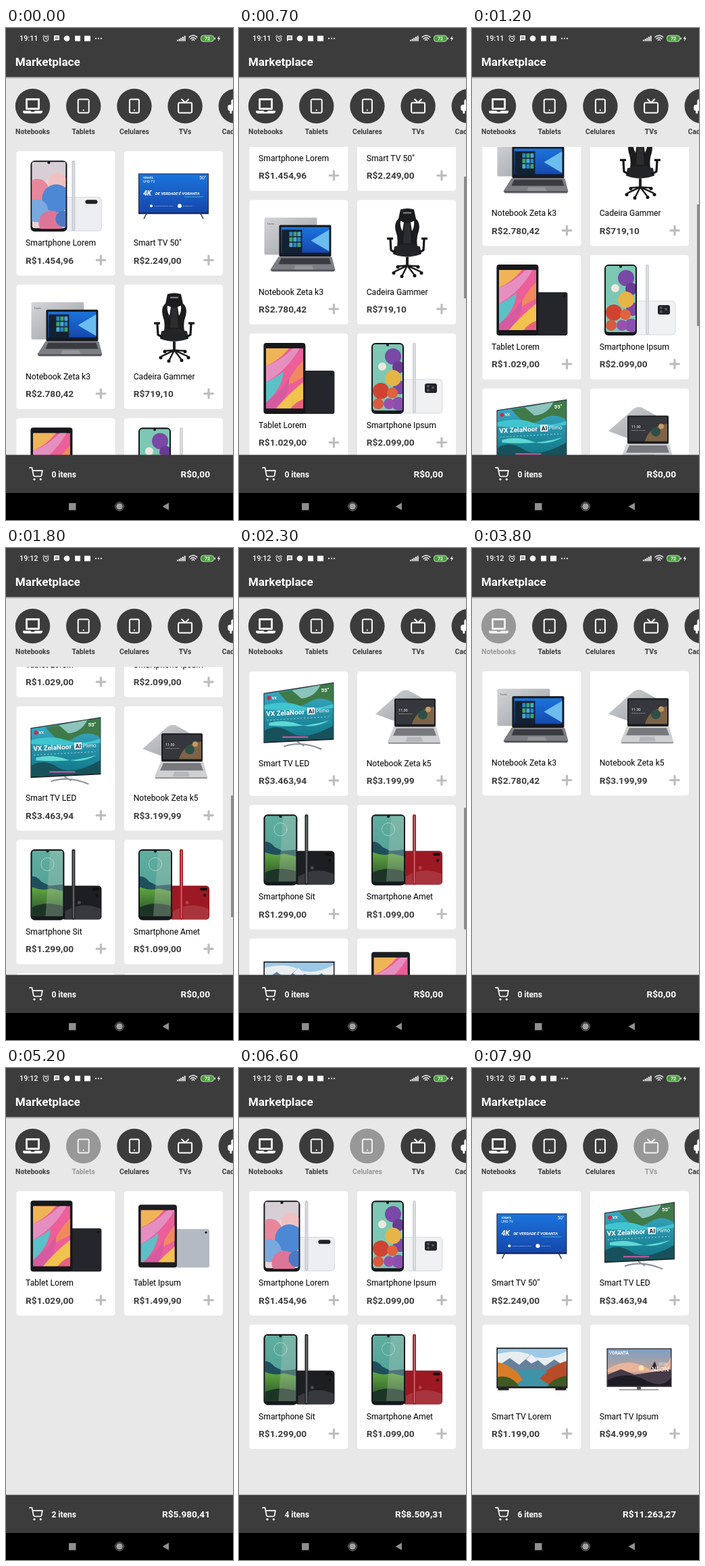
An HTML page for the animation above (8000 ms loop, 336 by 728 pixels).

```html
<!DOCTYPE html>
<html lang="pt-BR">
<head>
<meta charset="utf-8">
<title>Marketplace</title>
<style>
html, body { margin: 0; width: 100%; height: 100%; overflow: hidden; background: #e8e8e8; }
#stage { display: block; width: 336px; height: 728px; font-family: Roboto, sans-serif; }
.b { font-weight: 700; }
.name { font-size: 12.15px; fill: #000; }
.price { font-size: 13.69px; font-weight: 700; fill: #3c3c3c; }
.i { font-style: italic; }
</style>
</head>
<body>
<svg id="stage" viewBox="0 0 336 728"></svg>
<script>
const DARK = '#3c3c3c', LOOP = 8000, LIST_TOP = 176;
const stage = document.getElementById('stage');

// Drawing helpers
const box = (x, y, w, h, fill, r = 0) => `<rect x="${x}" y="${y}" width="${w}" height="${h}" rx="${r}" fill="${fill}"/>`;
const ball = (x, y, r, fill) => `<circle cx="${x}" cy="${y}" r="${r}" fill="${fill}"/>`;
const shape = (d, fill) => `<path d="${d}" fill="${fill}"/>`;
const line = (d, color, w, extra = '') => `<path d="${d}" fill="none" stroke="${color}" stroke-width="${w}" ${extra}/>`;
const text = (x, y, size, str, extra = '') => `<text x="${x}" y="${y}" font-size="${size}" fill="#fff" ${extra}>${str}</text>`;
const crop = (x, y, w, h, inner) => `<svg x="${x}" y="${y}" width="${w}" height="${h}">${inner}</svg>`;
const gradient = (id, from, to, dir = 'x2="0" y2="1"') =>
  `<linearGradient id="${id}" ${dir}><stop stop-color="${from}"/><stop offset="1" stop-color="${to}"/></linearGradient>`;

// Wallpapers
const bubbles = box(0, 0, 50, 98, '#e9d3d4', 4) + shape('M0 0H50V20L0 32Z', '#d8cfd6') +
  ball(8, 42, 17, '#e8879c') + ball(38, 30, 14, '#f1c1c2') + ball(36, 54, 21, '#4d88d4') +
  ball(7, 72, 17, '#79a9df') + ball(28, 90, 18, '#dd7598') + ball(47, 84, 12, '#4a78c4');
const fruits = box(0, 0, 44, 98, '#7cc8b4', 4) + ball(30, 18, 12, '#7a48a6') + ball(38, 34, 9, '#6a3a94') +
  ball(14, 33, 6, '#eee8e0') + ball(40, 64, 10, '#7a48a6') + ball(30, 50, 12, '#e6b548') + ball(12, 69, 12, '#cf4330') +
  ball(29, 72, 8, '#e0623c') + ball(38, 88, 10, '#8a4fb0') + ball(24, 88, 8, '#9a4fae') + ball(8, 88, 8, '#d85a40');
const coast = box(0, 0, 46, 97, 'url(#mist)', 4) + shape('M0 38Q8 38 14 46L26 52L46 50V70H0Z', '#1f4f5c') +
  shape('M0 54Q16 60 28 56L46 60V97H0Z', 'url(#grass)') + shape('M0 84Q20 74 46 82V97H0Z', '#1c3426') +
  shape('M27 0H46V97H20Z', 'rgba(190,205,190,.3)') +
  `<circle cx="23" cy="20" r="9.5" fill="none" stroke="#d9efe6" stroke-dasharray="1.5 1"/>`;
const swirl = box(0, 0, 60, 90, '#ec5f98') + shape('M0 0H34Q20 18 0 26Z', '#f0b458') +
  shape('M0 26Q20 20 40 0H50Q30 34 0 50Z', '#e58fc0') + shape('M60 14Q40 30 30 56L60 40Z', '#f08a5c') +
  shape('M0 50Q14 44 26 34Q24 60 0 80Z', '#5cc0c8') + shape('M0 80Q26 60 34 44Q36 70 14 90H0Z', '#d65aa0') +
  shape('M14 90Q34 66 60 46V74Q44 78 36 90Z', '#f2c24e') + shape('M36 90Q44 78 60 74V90Z', '#e8607c');

// Product pictures, each in a 105 x 105 box
const phone = (w, wall, side, back, camera) =>
  box(w - 4, 54, 109 - w, 50, back, 5) + `<rect x="${w - 4}" y="54" width="${109 - w}" height="50" rx="5" fill="none" stroke="#000" stroke-opacity=".18" stroke-width=".7"/>` +
  camera + box(0, 0, w, 105, '#16181c', 6) + crop(2, 2, w - 4, 99, wall) +
  ball(w / 2, 3, 2, '#16181c') + box(61, 0, 5, 104, side, 2) + box(63, 2, 1.2, 100, 'rgba(255,255,255,.45)');
const moto = (side, back) => phone(50, coast, side, back,
  box(91, 57, 11, 4, '#111', 2) + ball(98, 68, 2, '#111') + ball(72, 79, 2.5, 'rgba(255,255,255,.2)') +
  shape('M51 92Q75 76 104 88V99Q104 104 99 104H51Z', 'rgba(255,255,255,.12)'));
const tablet = (x, y, w, h, frame, back, top) =>
  box(x + w - 4, top, 109 - w - x, y + h - top, back, 3) + ball(100, top + 5, 1.6, '#111') +
  box(x, y, w, h, frame, 4) + crop(x + 3.5, y + 8, w - 7, h - 16, swirl);

const tv50 = line('M12 78L8 86M92 78L96 86', '#444', 1.5) +
  box(0, 19, 104, 60, '#15233c') + box(1, 20, 102, 57, 'url(#blue)') +
  text(7, 27, 3.2, 'VORANTA', 'class="b"') + text(7, 32.5, 5, 'UHD TV') + text(90, 28, 7, '50"') +
  text(7, 52, 10.5, '4K', 'class="b i"') + text(25, 51, 5.9, 'DE VERDADE É VORANTA', 'class="b i"') +
  line('M68 53.5H96', '#4fd0ff', .7) + ball(19, 67, 2, '#fff') + text(23, 68, 2.3, 'CONTROLE REMOTO ÚNICO') +
  ball(61, 67, 3, '#fff') + text(66, 68, 2.5, 'BLUETOOTH');
const tvLed = line('M30 97Q56 88 86 101M50 90L60 96', '#8b8f94', 2) + shape('M0 18L104 2V87L0 92Z', '#202428') +
  shape('M1 19L103 3.5V85L1 90Z', 'url(#sea)') + shape('M22 17L103 3.5V32Q84 20 66 32T34 30Z', '#3f7a48') +
  shape('M42 14L84 6Q76 24 56 26Z', '#8cc4bc') + shape('M1 36Q30 28 52 36T103 34V40Q60 46 1 42Z', '#3fc4d0') +
  shape('M1 74Q20 62 40 76T103 66V85L1 90Z', '#17525c') +
  shape('M8 62Q30 56 52 64T98 58Q60 70 8 66Z', '#5fd8d4') + box(28, 82, 38, 2, '#d65aa8') +
  ball(8, 25, 3, '#d0284c') + text(12, 27, 6, 'VX', 'class="b"') + text(85, 16, 8, '55"', 'class="b"') +
  `<g transform="rotate(-3 4 52)">${text(4, 52, 10, 'VX ZelaNoor', 'class="b"')}${box(65, 43, 11, 10, '#fff')}${text(66.5, 51.5, 9, 'AI', 'class="b" style="fill:#123"')}${text(77.5, 51, 7.8, 'Plimo')}</g>` +
  line('M5 58L96 53', '#c8f0ec', .8, 'stroke-dasharray="2 3"');
const tvLorem = box(0, 20, 105, 60, '#151515') + box(2, 78, 16, 5, '#222') + box(87, 78, 16, 5, '#222') +
  crop(1.5, 21.5, 102, 56, box(0, 0, 102, 56, '#9dc9e6') + shape('M0 8Q30 0 50 10T102 4V24H0Z', '#e8eef0') +
    shape('M0 26L18 14L32 24L50 8L70 26L84 16L102 28V56H0Z', '#66819a') + shape('M42 16L50 8L60 17L50 22Z', '#eef') +
    shape('M0 20Q14 22 30 36L44 56H0Z', '#d87c28') + shape('M102 18Q78 26 66 38L56 56H102Z', '#b84c28') +
    shape('M28 33Q50 27 74 34L62 44L80 56H22L40 44Z', '#3d93a8') + shape('M0 42Q20 38 32 56H0ZM102 40Q80 44 74 56H102Z', '#3d5a22'));
const tvIpsum = box(48, 78, 6, 5, '#555') + box(22, 81.5, 58, 1.5, '#888') + box(3.5, 21, 96, 57, '#1c1c20') +
  crop(4.5, 22, 94, 54.5, box(0, 0, 94, 55, 'url(#dusk)') + shape('M0 30Q28 12 54 26T94 12V34H0Z', '#e9b39a') +
    shape('M0 38L20 30L40 38L94 30V55H0Z', '#453a48') + shape('M0 46Q30 32 56 46T94 42V55H0Z', '#1d1c26') +
    ball(50, 28, 4, '#ffe3b0') + shape('M64 30L70 18L74 30Z', '#33242e')) +
  text(7, 30, 6.3, 'VORANTA', 'class="b"') + text(80, 46, 6, '2020') + text(70, 55, 9.5, 'NEON');
const laptop3 = box(1, 12, 78, 55, 'url(#steel)', 2) + text(5, 22, 4, 'Tavrix', 'style="fill:#555"') +
  box(23, 23, 77, 47, '#17181a', 2) + box(26, 26, 71, 40, 'url(#blue)') + shape('M97 30L70 46L97 62Z', '#6cbcf0') +
  box(27, 30, 30, 34, '#14212e') +
  [0, 1, 2].map(r => [0, 1, 2].map(c => box(38 + c * 6, 33 + r * 8, 5, 6.5, ['#2a86c8', '#3fa56a', '#49a7d8'][(r + c) % 3])).join('')).join('') +
  box(26, 64, 71, 2, '#0d1722') + shape('M22 70H101L106 89L104 92H13L10 89Z', '#7c7e83') +
  shape('M26 72H97L100 81H22Z', '#3a3b40') + shape('M47 83H72L74 89H45Z', '#95979b') + box(11, 89, 94, 2, '#4c4d52');
const laptop5 = shape('M6 49L42 17Q48 12 55 14L80 28L36 60Z', 'url(#steel)') + box(34, 26, 61, 42, '#1a1b1e', 2) +
  box(36, 28, 57, 36, '#35373c') + shape('M60 64Q66 42 93 38V64Z', '#7d6347') + ball(76, 50, 7, '#2e4f46') + ball(84, 42, 4, '#c39a62') +
  text(40, 45, 5.5, '11:30') + text(40, 49, 2.2, 'terça-feira, 8 de maio') + shape('M33 68H96L102 90L100 93H26L24 90Z', '#cfd0d2') +
  shape('M37 70H92L96 81H32Z', '#77797d') + shape('M53 83H74L76 90H51Z', '#b5b6b9') + box(25, 91, 77, 1.8, '#8b8c90');
const chair = shape('M43 0Q53 -3 63 0L66 14Q73 20 70 32Q66 42 68 54H38Q40 42 36 32Q33 20 40 14Z', '#1b1c1e') +
  shape('M43 17L48 19L46 32Q42 26 43 17ZM63 17L58 19L60 32Q64 26 63 17Z', '#fff') + shape('M49 20H57L59 50H47Z', '#2c2d30') +
  box(47, 4, 12, 2, '#888') + shape('M34 55Q53 48 72 55L74 66Q53 74 32 66Z', '#232427') +
  line('M23 43H32M74 43H83M28 44L29 60L36 64M78 44L77 60L70 64', '#151515', 3.2, 'stroke-linejoin="round"') +
  line('M53 70V84', '#222', 4) + line('M53 83L34 92M53 83L73 92M53 83L46 97M53 83L63 96M53 83L40 84M53 83L68 84', '#1a1a1a', 2.4) +
  [[33, 94], [74, 94], [45, 99], [64, 98], [39, 85], [69, 85]].map(([x, y]) => ball(x, y, 2.5, '#111')).join('');

const loremPhone = phone(54, bubbles, '#c9ccd2', '#eceef1', box(81, 58, 18, 6, '#222', 3));
const ipsumPhone = phone(48, fruits, '#cfd2d6', '#f0f1f3', box(79, 60, 18, 14, '#22242a', 3) + ball(84, 64, 2, '#555') + ball(84, 70, 2, '#555') + ball(91, 66, 2, '#555'));
const [NOTEBOOK, TABLET, PHONE, TV, CHAIR] = [0, 1, 2, 3, 4];
const products = [
  [PHONE, 'Smartphone Lorem', 1454.96, loremPhone],
  [TV, 'Smart TV 50"', 2249, tv50],
  [NOTEBOOK, 'Notebook Zeta k3', 2780.42, laptop3],
  [CHAIR, 'Cadeira Gammer', 719.10, chair],
  [TABLET, 'Tablet Lorem', 1029, tablet(0, 0, 62, 105, '#17181b', '#24262b', 41)],
  [PHONE, 'Smartphone Ipsum', 2099, ipsumPhone],
  [TV, 'Smart TV LED', 3463.94, tvLed],
  [NOTEBOOK, 'Notebook Zeta k5', 3199.99, laptop5],
  [PHONE, 'Smartphone Sit', 1299, moto('#26272a', '#1d1e21')],
  [PHONE, 'Smartphone Amet', 1099, moto('#a81c26', '#9c1822')],
  [TV, 'Smart TV Lorem', 1199, tvLorem],
  [TABLET, 'Tablet Ipsum', 1499.90, tablet(0, 6, 57, 93, '#1d1e21', '#b4bac4', 42)],
  [TV, 'Smart TV Ipsum', 4999.99, tvIpsum],
];

const money = v => 'R$' + v.toFixed(2).replace('.', ',').replace(/(\d)(\d{3},)/, '$1.$2');
const card = ([, name, price, picture]) => `<g class="card">${box(0, 0, 146, 184, '#fff', 4)}
  <g transform="translate(21 14)">${picture}</g>
  <text class="name" x="13.7" y="140">${name}</text><text class="price" x="13.7" y="166.3">${money(price)}</text>
  <path class="plus" d="M118.7 161.2H131.3M125 154.9V167.5" stroke="#bdbdbd" stroke-width="3.2" stroke-linecap="round"/></g>`;

const white = (d, w = 2) => line(d, '#fff', w, 'stroke-linejoin="round" stroke-linecap="round"');
const outline = (x, y, w, h) => `<rect x="${x}" y="${y}" width="${w}" height="${h}" rx="2" fill="none" stroke="#fff" stroke-width="2"/>`;
const categories = [
  ['Notebooks', white('M-9 -10H9V4H-9Z', 2.8) + shape('M-14.5 7H-3Q-3 8.5 0 8.5T3 7H14.5V8Q14.5 11 11.5 11H-11.5Q-14.5 11 -14.5 8Z', '#fff')],
  ['Tablets', outline(-8, -10, 16, 20) + ball(0, 6, 1.1, '#fff')],
  ['Celulares', outline(-7, -10, 14, 20) + ball(0, 6, 1.1, '#fff')],
  ['TVs', outline(-10, -5, 20, 15) + white('M-5 -10L0 -5L5 -10')],
  ['Cadeiras', box(-7, -10, 14, 11, '#fff', 3) + box(-12, -2, 24, 9, '#fff', 3) + box(-9, 5, 3, 6, '#fff') + box(6, 5, 3, 6, '#fff')],
];
const category = ([name, icon], i) => `<g class="cat" transform="translate(${39.5 + 75.2 * i} 115.5)">${ball(0, 0, 25.7, DARK)}${icon}
  <text class="b" y="41" font-size="10.4" fill="${DARK}" text-anchor="middle">${name}</text></g>`;

const statusBar = text(20, 19.3, 10.8, '', 'id="clock" font-weight="500"') +
  `<circle cx="59" cy="16" r="3.8" fill="none" stroke="#fff"/>` + white('M59 14V16.3H60.7M54.5 12.5L56.5 11M63.5 12.5L61.5 11', 1) +
  shape('M71 11H79V18H73L71 20Z', '#fff') + line('M72.5 13.5H77.5M72.5 15.7H77.5', DARK, .9) +
  ball(90, 15.5, 4.3, '#fff') + box(102, 11.5, 8, 8, '#fff') + box(116, 11.5, 9, 8, '#fff') +
  ball(133, 15.5, 1.1, '#fff') + ball(137, 15.5, 1.1, '#fff') + ball(141, 15.5, 1.1, '#fff') +
  [0, 1, 2, 3, 4].map(i => box(253 + i * 2.7, 17.5 - i * 1.5, 1.8, 2 + i * 1.5, '#fff')).join('') +
  white('M271 13.5Q277 8.5 283 13.5M273 16Q277 12.5 281 16M275.3 18Q277 16.5 278.7 18', 1.3) +
  `<rect x="288.5" y="11" width="19" height="9" rx="3.5" fill="#4a9c3e" stroke="#bfe3b6"/>` + box(308.5, 14, 1.3, 3, '#fff') +
  text(298, 18.2, 7.2, '72', 'text-anchor="middle" class="b"') +
  shape('M315.8 11.5L312.8 16H314.8L314 19.8L317.2 14.8H315.2Z', '#fff');
const cartIcon = `<g transform="translate(34.2 649.8) scale(.8556)">${white('M1 1H5L7.7 14.4Q8 16 9.7 16H19.4Q21 16 21.4 14.4L23 6H6')}
  ${ball(9, 21, 1.9, '#fff')}${ball(20, 21, 1.9, '#fff')}</g>`;

stage.innerHTML = `<defs>${gradient('blue', '#1b74dc', '#1546ac')}${gradient('sea', '#3fb0cc', '#0f7484')}
  ${gradient('mist', '#5fae9f', '#4a9a94')}${gradient('grass', '#62a83e', '#234a2c')}
  ${gradient('dusk', '#7c9ec4', '#f0a878')}${gradient('steel', '#d3d5d8', '#9a9da2', 'x2="1" y2="1"')}${gradient('shade', '#8c8c8c', '#e8e8e8')}
  <clipPath id="view">${box(0, LIST_TOP, 336, 456, '#000')}</clipPath></defs>
  ${box(0, 0, 336, 728, '#e8e8e8')}
  <g clip-path="url(#view)">${products.map(card).join('')}<rect id="bar" x="333" width="3" height="180" fill="#8c8c8c"/></g>
  ${box(0, 72, 336, 3.5, 'url(#shade)')}${box(0, 0, 336, 72.3, DARK)}${statusBar}
  ${text(13.7, 56, 17.15, 'Marketplace', 'class="b"')}
  ${categories.map(category).join('')}
  ${box(0, 631.6, 336, 57, DARK)}${cartIcon}
  ${text(67.5, 665, 12, '', 'id="count" class="b"')}${text(302, 665, 13.69, '', 'id="total" class="b" text-anchor="end"')}
  ${box(0, 688, 336, 40, '#000')}${box(93, 703, 10.5, 10.5, '#8f8f8f', .5)}
  <circle cx="168" cy="708" r="6.3" fill="none" stroke="#8f8f8f" stroke-width="1"/>${ball(168, 708, 4.8, '#a0a0a0')}
  ${shape('M231.5 708L241 702.5V713.5Z', '#8f8f8f')}`;

const byId = id => document.getElementById(id);
const cards = [...document.querySelectorAll('.card')], cats = [...document.querySelectorAll('.cat')];
const pluses = cards.map(c => c.querySelector('.plus'));
const clock = byId('clock'), bar = byId('bar'), count = byId('count'), total = byId('total');

// [time, scroll offset], joined by a smooth curve
const scrollKeys = [[0, 0], [200, 12], [700, 125], [1200, 241], [1800, 540], [2150, 660], [2700, 309], [3300, 0], [8000, 0]];
const filters = [[3700, NOTEBOOK], [5000, TABLET], [6400, PHONE], [7700, TV]];
const additions = [[4050, 2], [4450, 7], [5600, 4], [6000, 11], [6900, 0], [7400, 8]];

function slope(i) {
  if (i === 0 || i >= scrollKeys.length - 2) return 0;
  const [a, b] = [scrollKeys[i - 1], scrollKeys[i + 1]];
  return (b[1] - a[1]) / (b[0] - a[0]);
}
function scrollAt(t) {
  const i = scrollKeys.findIndex(k => k[0] > t) - 1;
  const [t0, a] = scrollKeys[i], [t1, b] = scrollKeys[i + 1];
  const d = t1 - t0, u = (t - t0) / d, v = 1 - u;
  return Math.max(0, v * v * (1 + 2 * u) * a + u * u * (3 - 2 * u) * b + u * v * d * (v * slope(i) - u * slope(i + 1)));
}

function render(t) {
  const scroll = scrollAt(t);
  const selected = filters.filter(f => f[0] <= t).pop()?.[1];
  const cart = additions.filter(a => a[0] <= t);
  let slot = 0;
  cards.forEach((el, i) => {
    const shown = selected === undefined || products[i][0] === selected;
    el.style.display = shown ? '' : 'none';
    if (!shown) return;
    el.setAttribute('transform', `translate(${15.4 + slot % 2 * 159.6} ${182.3 + (slot >> 1) * 197.5 - scroll})`);
    const pressed = cart.find(a => a[1] === i);
    pluses[i].style.opacity = pressed ? Math.min(1, .2 + .8 * (t - pressed[0]) / 250) : 1;
    slot++;
  });
  cats.forEach((el, i) => el.style.opacity = i === selected ? .46 : 1);
  bar.setAttribute('y', LIST_TOP + scroll * .352);
  bar.style.opacity = t < 50 ? 0 : Math.max(0, Math.min(1, (3600 - t) / 200));
  clock.textContent = t < 1500 ? '19:11' : '19:12';
  count.textContent = cart.length + ' itens';
  total.textContent = money(cart.reduce((sum, a) => sum + products[a[1]][2], 0));
}

function tick() {
  render(performance.now() % LOOP);
  requestAnimationFrame(tick);
}
tick();
</script>
</body>
</html>
```
